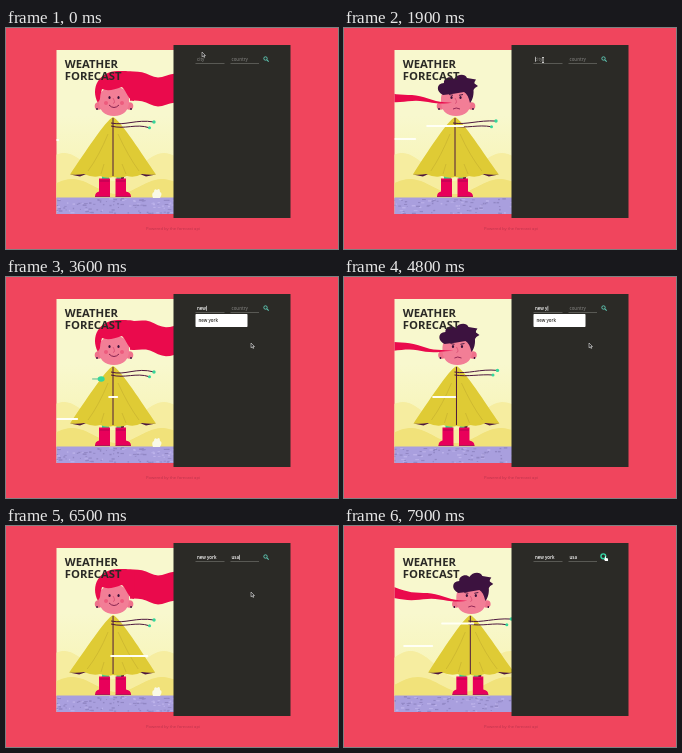
An HTML page that plays this animation: 332 px wide and 221 px high, repeating every 8 s.

```html
<!DOCTYPE html>
<html lang="en">
<head>
<meta charset="utf-8">
<title>Weather forecast</title>
<style>
html, body { margin: 0; width: 100%; height: 100%; overflow: hidden; background: #f0455d; }
svg { display: block; width: 332px; height: 221px; }
text { font-family: "Open Sans", "Noto Sans", sans-serif; white-space: pre; }
.title { font-weight: 700; font-size: 11.3px; fill: #2b2a26; }
.field { font-size: 4.4px; font-weight: 600; fill: #fff; }
.coat { fill: #dfcb35; }
.folds { fill: none; stroke: #cbb530; stroke-width: .8; }
.ties { fill: none; stroke: #4d173f; }
.tip { fill: #35d79a; }
</style>
</head>
<body>
<svg viewBox="0 0 332 221">
  <defs>
    <clipPath id="card"><rect x="50.500" y="22" width="118" height="164"/></clipPath>
    <linearGradient id="sky" x1="0" y1="0" x2="0" y2="1">
      <stop offset=".4" stop-color="#f8f8ce"/><stop offset="1" stop-color="#f7f2a8"/>
    </linearGradient>
    <g id="legs">
      <path d="M-11 143H-4V152H-11Z" fill="#2fd594"/>
      <path d="M4 143H12L10.500 152H4Z" fill="#39113a"/>
      <path d="M3.500 148.500H8V152H3.500Z" fill="#2fd594"/>
      <path d="M-14 150.500H-3V168.500H-18Q-18 164.500 -14 163.500Z M2.500 150.500H13V163.500Q18 164.500 18 168.500H2.500Z" fill="#e8005a"/>
      <path d="M-18 168.500H-3M2.500 168.500H18M-13.500 153H-3.500M3 153H12.500" stroke="#a3004f" stroke-width=".8"/>
    </g>
    <g id="body">
      <use href="#legs"/>
      <path class="lining" fill="#4d173f"/>
      <path class="coat"/><path class="folds"/><path class="ties"/>
      <circle class="tip" r="1.700"/><circle class="tip" r="1.500"/>
    </g>
    <g id="face">
      <circle cx="-15.500" cy="78" r="3.800" fill="#ef718b"/>
      <circle cx="15.500" cy="78" r="3.800" fill="#ef718b"/>
      <path d="M-17 80V82M17 80V82" stroke="#39113a" stroke-width="1.400"/>
      <path d="M-15 70C-14 55 14 55 15 70C16 83 9 88 0 88S-16 83 -15 70Z" fill="#f27e96"/>
      <path d="M-1 70Q2 75 -1 75.500" fill="none" stroke="#d94f74" stroke-width=".8"/>
      <ellipse cx="-4.500" cy="69.500" rx="1.100" ry="1.600" fill="#39113a"/>
      <ellipse cx="4.500" cy="69.500" rx="1.100" ry="1.600" fill="#39113a"/>
    </g>
  </defs>

  <rect width="332" height="221" fill="#f0455d"/>

  <g clip-path="url(#card)">
    <rect x="50" y="22" width="119" height="164" fill="url(#sky)"/>
    <path id="farHill" fill="#f6eda0"/>
    <path id="nearHill" fill="#f1e27a"/>
    <g id="ground"><rect x="-20" y="169.500" width="800" height="17" fill="#a99fde"/></g>

    <g id="boy">
      <use href="#body"/>
      <g transform="translate(1 0)">
        <use href="#face"/>
        <path d="M-13 67C-20 64 -20 55 -12 55C-13 50 -5 47 -2 51C1 46 9 45 11 50L20 51.500Q18 54 18.500 55.500L22 58Q18 60 17.500 62C18 68 16 73 14 75Q12 66 8 64Q-2 66 -13 67Z" fill="#3c123f"/>
        <path d="M-7 66.500L-3 67.300M3 67.300L7 66.500" stroke="#39113a" stroke-width=".9"/>
        <path d="M-3 81Q0 79 4 81" fill="none" stroke="#8b204e" stroke-width=".9"/>
      </g>
    </g>

    <g id="girl">
      <path d="M39 170Q37 165 40 164Q40 160 43 162Q46 159 46 164Q49 165 46 170Z" fill="#fafae6"/>
      <use href="#body" x="-1"/>
      <path id="hair" fill="#ea0a4c"/>
      <use href="#face"/>
      <path d="M-16 75C-24 60 -15 43 4 43C12 43 17 43 20 44V73C15 73 13 64 8 59Q-5 64 -12 61Q-14 67 -14 71Z" fill="#ea0a4c"/>
      <path d="M-5 77Q0 82 5 77" fill="none" stroke="#7b1a48" stroke-width=".9"/>
      <circle cx="-8" cy="75" r="2" fill="#ed5b7d"/><circle cx="8" cy="75" r="2" fill="#ed5b7d"/>
    </g>
    <use id="nextGirl" href="#girl"/>
    <g id="wind" fill="#fffff5"></g>
    <g id="leaf"><path d="M-9 0H-3" stroke="#2aa982" stroke-width=".8"/><ellipse rx="3.500" ry="2.800" fill="#35d79a"/></g>
  </g>

  <text class="title" x="58.800" y="40">WEATHER</text>
  <text class="title" x="58.800" y="52.300">FORECAST</text>
  <rect x="167.500" y="17" width="117" height="173" fill="#2b2a26"/>
  <path d="M189.500 35.500H218.500M224.500 35.500H253" stroke="#6e6d69" stroke-width=".7"/>
  <text class="field" id="city" x="191" y="32.500"></text>
  <text class="field" id="land" x="225.500" y="32.500"></text>
  <rect id="caret" y="28.800" width=".6" height="5" fill="#fff"/>
  <g id="search" fill="none" stroke="#5dc3b0">
    <circle cx="-.5" cy="-.5" r="1.700" stroke-width="1"/><path d="M.8 .8L2.700 2.700" stroke-width="1.100"/>
  </g>
  <g id="list">
    <rect x="189.500" y="37" width="52" height="13" rx=".7" fill="#fff"/>
    <text x="192.500" y="45.200" font-size="4.400" font-weight="600" fill="#2b2a26">new york</text>
  </g>
  <text x="167" y="202" text-anchor="middle" font-size="4.200" fill="#bd344d">Powered by the forecast api</text>
  <path id="arrow" d="M0 0V4.800L1.200 3.800L2 5.500L2.800 5.100L2 3.500H3.500Z" fill="#252525" stroke="#fff" stroke-width=".5"/>
  <path id="beam" d="M-1 -2.500H1M0 -2.500V2.500M-1 2.500H1" stroke="#fff" stroke-width=".7"/>
  <path id="hand" d="M1 0Q2 0 2 2L4 2.500V5H1L0 3L1 2.500Z" fill="#fff"/>
</svg>
<script>
const LOOP = 8000, GAP = 180, PAN = 700;
const $ = id => document.getElementById(id);
const set = (el, name, value) => el.setAttribute(name, value);
const place = (el, x, y = 0, s = 1) => set(el, 'transform', `translate(${x} ${y}) scale(${s})`);
const show = (el, on) => set(el, 'visibility', on ? 'visible' : 'hidden');
const clamp = v => Math.max(0, Math.min(1, v));
const ease = p => p < .5 ? 4 * p ** 3 : 1 - 4 * (1 - p) ** 3;
const smooth = p => p * p * (3 - 2 * p);

// start of each camera move along the queue
const pans = [1120, 2680, 4190, 5830, 7395];
// time, x, y
const mouse = [[0, 196, 24], [400, 196, 25], [850, 199, 32], [2200, 199, 32], [2420, 245, 66],
  [6550, 245, 66], [6800, 272, 52], [7450, 260, 30]];
const cityKeys = [2700, 2900, 3100, 4350, 4500, 4900, 5050, 5200];
const landKeys = [6050, 6200, 6400];
// time, x, y, width
const gusts = [[300, 84, 112, 26], [1000, 122, 130, 38], [1900, 82, 98, 38], [1900, 50, 111, 22],
  [2450, 52, 124, 24], [3000, 70, 130, 36], [3600, 50, 142, 22], [3600, 102, 120, 10],
  [4200, 118, 130, 34], [4800, 88, 120, 24], [5400, 70, 98, 30], [5950, 60, 142, 25],
  [6500, 104, 130, 38], [7200, 86, 112, 28], [7900, 97, 97.5, 33], [7900, 59, 120, 30]];

function make(parent, name, attrs) {
  const el = document.createElementNS('http://www.w3.org/2000/svg', name);
  for (const key in attrs) set(el, key, attrs[key]);
  parent.append(el);
  return el;
}

let seed = 9;
const rand = () => (seed = seed * 16807 % 2147483647) / 2147483647;
for (let i = 0; i < 260; i++) {
  const x = rand() * 2 * GAP, y = 170 + rand() * 15;
  const fill = i % 3 ? '#9187c4' : '#bcb2ea', width = 1 + rand() * 3, height = .7 + rand();
  for (const shift of [0, 2 * GAP]) {
    make($('ground'), 'rect', { x: x + shift, y, width, height, fill });
  }
}
const streaks = gusts.map(g => make($('wind'), 'rect', { y: g[2] - 1, height: 2, rx: 1 }));

function hill(el, base, height, span, shift) {
  let d = 'M50 170';
  for (let x = 50; x <= 170; x += 3) {
    d += `L${x} ${base - height * Math.cos((x - shift) * Math.PI / span) ** 2}`;
  }
  set(el, 'd', d + 'V170Z');
}

function drawHair(t) {
  const top = [], low = [];
  for (let r = 16; r <= 180; r += 4) {
    const sway = 3 * clamp((r - 16) / 26) * (1 - .65 * clamp((r - 60) / 50));
    const mid = 56.5 + r * .102 + sway * Math.sin(.14 * r + 1.97 - t * Math.PI / 250);
    const half = Math.min(29, 26 * (1 - r / 180) + 14 * (1 - smooth(clamp((r - 45) / 70)))) / 2;
    top.push(`${r} ${mid - half}`);
    low.unshift(`${r} ${mid + half}`);
  }
  set($('hair'), 'd', 'M' + top.concat(low).join('L') + 'Z');
}

function drawBody(t) {
  const body = $('body'), part = name => body.querySelector('.' + name);
  const s = Math.sin(t * Math.PI / 300), left = -43 + s, right = 43 + s;
  set(part('lining'), 'd', `M${left} 146.500L${left + 10} 148.500L-24 145ZM${right} 146.500L${right - 10} 148.500L24 145Z`);
  set(part('coat'), 'd', `M0 89C-7 92 -29 126 ${left} 146.500Q-34 147 -29 146Q-20 150 -13 148Q-6 151 0 149Q8 151 14 148Q22 150 29 146Q36 147 ${right} 146.500C29 126 8 93 0 89Z`);
  set(part('folds'), 'd', `M-5 106Q-14 128 ${-25 + s} 143M5 106Q15 128 ${26 + s} 143M-9 136L-12 146M9 136L13 146`);
  const ends = [[41, 94], [36.5, 99]];
  let d = 'M0 90V148';
  ends.forEach(([x, y], i) => {
    const w = Math.sin(t * Math.PI / 250 + i), start = 95 + i * 3;
    d += `M-2 ${start}C12 ${start + 3 + w} 23 ${start - 4 - w + i * 2} ${x} ${y + w}`;
    const dot = body.querySelectorAll('.tip')[i];
    set(dot, 'cx', x);
    set(dot, 'cy', y + w);
  });
  set(part('ties'), 'd', d);
}

function mouseAt(t) {
  let i = 0;
  while (i < mouse.length - 2 && t > mouse[i + 1][0]) i++;
  const a = mouse[i], b = mouse[i + 1], p = smooth(clamp((t - a[0]) / (b[0] - a[0])));
  return [a[1] + (b[1] - a[1]) * p, a[2] + (b[2] - a[2]) * p];
}

function type(el, full, keys, t, hint) {
  const value = full.slice(0, keys.filter(k => t >= k).length);
  el.textContent = value || hint;
  set(el, 'fill-opacity', value ? 1 : .35);
  return value ? el.getComputedTextLength() : 0;
}

function drawForm(t) {
  const cityWidth = type($('city'), 'new york', cityKeys, t, 'city');
  const landWidth = type($('land'), 'usa', landKeys, t, 'country');
  const inCity = t >= 1400 && t < 5550, inLand = t >= 5550 && t < 7800;
  const lastKey = [1400, ...cityKeys, 5550, ...landKeys].filter(k => k <= t).pop() || 0;
  show($('caret'), (inCity || inLand) && (t - lastKey) % 1000 < 550);
  set($('caret'), 'x', inLand ? 225.8 + landWidth : 191.3 + cityWidth);
  show($('list'), t >= 2150 && t < 5300);

  const [x, y] = mouseAt(t), overText = t >= 750 && t < 2250, hover = t >= 7400;
  const shown = hover ? 'hand' : overText ? 'beam' : 'arrow';
  for (const id of ['hand', 'beam', 'arrow']) {
    show($(id), id === shown);
    place($(id), x, y);
  }
  place($('search'), 260, 31, hover ? 1.4 : 1);
  set($('search'), 'stroke', hover ? '#35d7a5' : '#5dc3b0');
}

function render(t) {
  const cam = pans.reduce((sum, start) => sum + ease(clamp((t - start) / PAN)), 0);
  const off = -(cam % 2) * GAP;
  place($('girl'), 108 + off);
  place($('nextGirl'), 2 * GAP);
  place($('boy'), 111 + off + GAP);
  place($('ground'), off);
  hill($('farHill'), 153, 28, 100, 58 - cam * 100);
  hill($('nearHill'), 166, 15, 90, 66 - cam * 90);
  drawHair(t);
  drawBody(t);

  gusts.forEach(([time, x, , width], i) => {
    const d = t - time, grow = clamp(1.5 - Math.abs(d) / 250);
    set(streaks[i], 'x', x + d * .16 + width * (1 - grow) / 2);
    set(streaks[i], 'width', width * grow);
  });
  const early = t < 2200, flight = t - (early ? 1000 : 3600);
  place($('leaf'), (early ? 77 : 95) + flight * .16, (early ? 126 : 102) - 5 * Math.sin(flight / 160), early ? .7 : 1);
  show($('leaf'), Math.abs(flight) < 450);
  drawForm(t);
}

const begin = performance.now();
function frame(now) {
  render(Math.max(0, now - begin) % LOOP);
  requestAnimationFrame(frame);
}
render(0);
requestAnimationFrame(frame);
</script>
</body>
</html>
```
